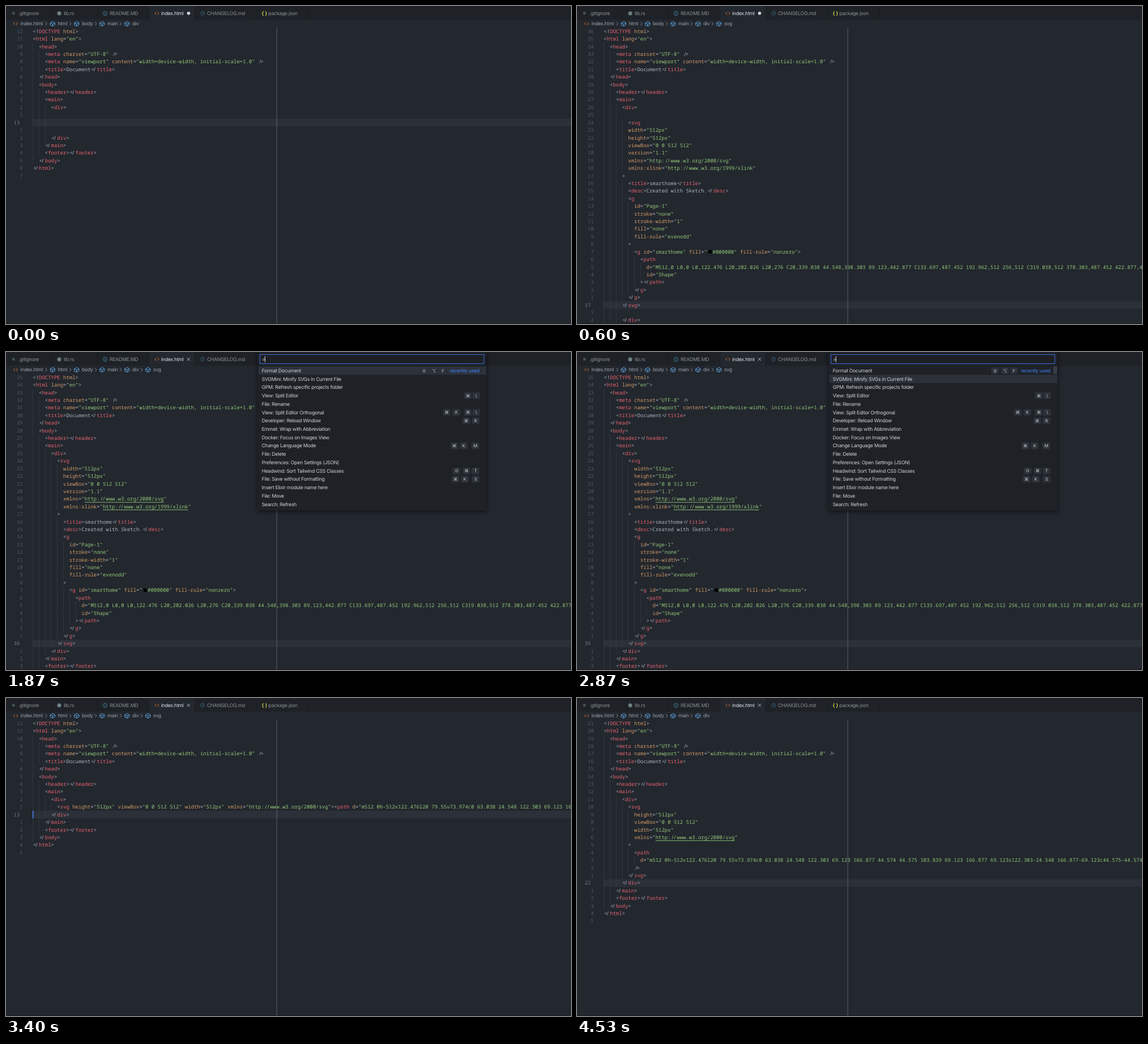
Recreate the animation shown at these times as an HTML page with a canvas. Size 998x561 px, loop 4730 ms.

```html
<!DOCTYPE html>
<html lang="en">
<head>
<meta charset="UTF-8">
<title>Minify SVG in the editor</title>
<style>
html, body { margin: 0; width: 100%; height: 100%; overflow: hidden; background: #23272e; }
canvas { display: block; }
</style>
</head>
<body>
<canvas id="stage" width="998" height="561"></canvas>
<script>
const ctx = document.getElementById('stage').getContext('2d');
const LOOP = 4730, W = 998, H = 561;
const LEFT = 47.3, TOP = 38, ROW = 13.41, CELL = 5.376;
const MONO = '8.96px "Noto Sans Mono", "DejaVu Sans Mono", monospace';
const SANS = '8.68px Inter, "Liberation Sans", sans-serif';
const KEYS = '7.4px Inter, "DejaVu Sans", sans-serif';
const RED = '#e7636f', ORANGE = '#d19a66', GREEN = '#91c778', PLAIN = '#abb2bf';
const SWATCH = '■';

// Documents
const page = (...inner) => [
  '<!DOCTYPE html>', '<html lang="en">', '  <head>', '    <meta charset="UTF-8" />',
  '    <meta name="viewport" content="width=device-width, initial-scale=1.0" />',
  '    <title>Document</title>', '  </head>', '  <body>', '    <header></header>',
  '    <main>', '      <div>', ...inner, '      </div>', '    </main>',
  '    <footer></footer>', '  </body>', '</html>', ''
];

const longSvg = (pad, swatch) => ['        <svg', ...`
  width="512px"
  height="512px"
  viewBox="0 0 512 512"
  version="1.1"
  xmlns="http://www.w3.org/2000/svg"
  xmlns:xlink="http://www.w3.org/1999/xlink"
>
  <title>smarthome</title>
  <desc>Created with Sketch.</desc>
  <g
    id="Page-1"
    stroke="none"
    stroke-width="1"
    fill="none"
    fill-rule="evenodd"
  >
    <g id="smarthome" fill="${swatch}#000000" fill-rule="nonzero">
      <path
        d="M512,0 L0,0 L0,122.476 L20,202.026 L20,276 C20,339.038 44.548,398.303 89.123,442.877 C133.697,487.452 192.962,512 256,512 C319.038,512 378.303,487.452 422.877,442.877 C467.452,398.303"
        id="Shape"
      ></path>
    </g>
  </g>
</svg>`.trim().split('\n').map((s, i) => ' '.repeat(i ? pad : pad + 2) + s)];

const shortPath = 'd="m512 0h-512v122.476l20 79.55v73.974c0 63.038 24.548 122.303 69.123 166.877 ' +
  '44.574 44.575 103.839 69.123 166.877 69.123s122.303-24.548 166.877-69.123c44.575-44.574 69.123-103.839"';

const empty = page('', '', '');
const pasted = page('', ...longSvg(6, ''), '');
const swatched = page('', ...longSvg(6, SWATCH), '');
const tidy = page(...longSvg(8, SWATCH));
const minified = page('        <svg height="512px" viewBox="0 0 512 512" width="512px" ' +
  'xmlns="http://www.w3.org/2000/svg"><path ' + shortPath);
const final = page('        <svg', ...['height="512px"', 'viewBox="0 0 512 512"', 'width="512px"',
  'xmlns="http://www.w3.org/2000/svg"'].map(s => ' '.repeat(10) + s),
  '        >', '          <path', '            ' + shortPath, '          />', '        </svg>');

// Each step changes part of the editor state; caret is a column, or -1 when hidden
const steps = [
  [0, { doc: empty, row: 12, caret: -1, depth: 4, dirty: true, links: false, palette: false }],
  [70, { doc: pasted, row: 36, caret: 12 }],
  [270, { depth: 5 }],
  [400, { doc: swatched }],
  [600, { caret: -1 }],
  [930, { doc: tidy, row: 35, caret: 14 }],
  [1000, { dirty: false }],
  [1070, { links: true }],
  [1400, { caret: -1 }],
  [1870, { palette: true, pick: 0, input: true, thumb: false }],
  [1930, { thumb: true }],
  [2400, { input: false }],
  [2730, { pick: 1 }],
  [2870, { input: true }],
  [3270, { palette: false }],
  [3400, { doc: minified, row: 12, caret: 0, links: false }],
  [3600, { depth: 4 }],
  [3870, { caret: -1 }],
  [4070, { doc: final, row: 21, caret: 0 }],
  [4400, { links: true }],
  [4530, { caret: -1 }]
];

// Drawing helpers
function rect(x, y, w, h, color) {
  ctx.fillStyle = color;
  ctx.fillRect(x, y, w, h);
}

function text(s, x, y, color, font = SANS, align = 'left') {
  ctx.font = font;
  ctx.letterSpacing = font === SANS ? '-0.26px' : '0px';
  ctx.textAlign = align;
  ctx.fillStyle = color;
  ctx.fillText(s, x, y);
}

function line(color, width, ...points) {
  ctx.strokeStyle = color;
  ctx.lineWidth = width;
  ctx.beginPath();
  points.forEach(([x, y]) => ctx.lineTo(x, y));
  ctx.stroke();
}

function circle(x, y, r, color, filled) {
  ctx.beginPath();
  ctx.arc(x, y, r, 0, 7);
  ctx.fillStyle = ctx.strokeStyle = color;
  ctx.lineWidth = 0.8;
  filled ? ctx.fill() : ctx.stroke();
}

function angles(x, y) {
  for (const d of [-1, 1])
    line('#e37933', 1, [x + d * 1.2, y - 2.4], [x + d * 3.6, y], [x + d * 1.2, y + 2.4]);
}

function cube(x, y) {
  const blue = '#61afef', l = [x - 4.2, y - 1.4], r = [x + 4.2, y - 1.4], mid = [x, y + 0.5];
  line(blue, 0.9, l, [x + 0.5, y - 4], r, [x + 4.2, y + 1.8], [x, y + 4.2], [x - 4.2, y + 2.4], l, mid, r);
  line(blue, 0.9, mid, [x, y + 4.2]);
}

function drawTabs(s) {
  rect(0, 0, W, 24, '#1e2227');
  rect(252.5, 0, 81, 24, '#23272e');
  for (const x of [80, 161, 252, 333, 441, 534]) rect(x, 0, 0.8, 24, '#181a1f');
  [['.gitignore', 22], ['lib.rs', 102], ['README.MD', 183], ['index.html', 274],
   ['CHANGELOG.md', 355], ['package.json', 463.5]].forEach(([name, x], i) =>
    text(name, x, 16, i === 3 ? '#e3e5e9' : '#8b9099'));
  rect(11, 10.5, 4.5, 4.5, '#41535b');
  circle(94, 13, 3.5, '#6d8086', true);
  circle(175, 13, 3.7, '#4787a5');
  rect(174.5, 12.2, 1, 3.2, '#4787a5');
  rect(174.5, 10.5, 1, 1, '#4787a5');
  angles(266.5, 12.8);
  circle(347.3, 12.8, 3.4, '#3f6d87');
  line('#3f6d87', 0.8, [347.3, 10.8], [347.3, 13], [349, 13]);
  text('{ }', 451.5, 15.8, '#cbcb41', 'bold ' + SANS);
  if (s.dirty) circle(322.5, 12.8, 2.8, '#d0d3d8', true);
  else for (const d of [-2.6, 2.6]) line('#d0d3d8', 0.9, [322.5 - d, 10.2], [322.5 + d, 15.4]);
}

function drawCrumbs(depth) {
  const gray = '#9da3ad';
  angles(17, 31.3);
  text('index.html', 25.5, 34.3, gray);
  [['html', 91.5], ['body', 134], ['main', 179], ['div', 223], ['svg', 260]].slice(0, depth).forEach(([name, x]) => {
    line(gray, 0.8, [x - 22, 28.2], [x - 19, 31.3], [x - 22, 34.4]);
    cube(x - 9.2, 31.3);
    text(name, x, 34.3, gray);
  });
}

function colors(s) {
  const out = Array(s.length).fill(PLAIN);
  for (const m of s.matchAll(/(<!?\/?)(\w+)|"[^"]*"?|[\w:-]+(?==")|(?<=DOCTYPE )html/g)) {
    const skip = m[1] ? m[1].length : 0;
    const color = skip ? RED : m[0][0] === '"' ? GREEN : ORANGE;
    out.fill(color, m.index + skip, m.index + m[0].length);
  }
  return out;
}

// Pairs such as </ and /> sit closer together than plain cells
function nudge(a, c, b) {
  if (c === '<' && b === '/') return 0.7;
  if (c === '/') return a === '<' ? -1.1 : b === '>' ? 1.1 : b === '/' ? 0.6 : a === '/' ? -0.6 : 0;
  return c === '>' && a === '/' ? -0.7 : 0;
}

function drawLine(s, top, links) {
  const tint = colors(s);
  let x = LEFT;
  for (let i = 0; i < s.length && x < W; i++) {
    const c = s[i];
    if (c === SWATCH) {
      rect(x + 2, top + 3.7, 6, 6, '#000');
      x += 9.5;
      continue;
    }
    if (c !== ' ') text(c, x + nudge(s[i - 1], c, s[i + 1]), top + 9.8, tint[i], MONO);
    x += CELL;
  }
  const url = links && s.match(/http:[^"]+/);
  if (url) rect(LEFT + url.index * CELL, top + 12.1, url[0].length * CELL, 0.9, GREEN);
}

function drawCode(s) {
  rect(LEFT, TOP + s.row * ROW, W, ROW, '#2b3039');
  let indent = 0;
  s.doc.forEach((str, i) => {
    const top = TOP + i * ROW;
    if (top > H) return;
    if (str) indent = str.search(/\S/);
    for (let col = 0; col < indent; col += 2) rect(LEFT + col * CELL, top, 0.7, ROW, '#3a3f48');
    if (i === s.row) text(i + 1, 13.6, top + 9.8, '#737b8a', MONO);
    else text(Math.abs(i - s.row), 29.7, top + 9.8, '#515a6b', MONO, 'right');
    drawLine(str, top, s.links);
  });
  rect(477.8, TOP, 0.9, H, '#60656e');
  if (s.caret >= 0) rect(LEFT - 0.3 + s.caret * CELL, TOP + s.row * ROW, 1.4, ROW, '#528bff');
  rect(0, 560, W, 1, '#181a1f');
}

// Command name, then pairs of key and key centre
const commands = [
  ['Format Document', '⇧', 738.5, '⌥', 756, 'F', 772],
  ['SVGMini: Minify SVGs in Current File'],
  ['GPM: Refresh specific projects folder'],
  ['View: Split Editor', '⌘', 816, '\\', 830.5],
  ['File: Rename'],
  ['View: Split Editor Orthogonal', '⌘', 778.5, 'K', 795.5, '⌘', 816, '\\', 830.5],
  ['Developer: Reload Window', '⌘', 813, 'R', 829.5],
  ['Emmet: Wrap with Abbreviation'],
  ['Docker: Focus on Images View'],
  ['Change Language Mode', '⌘', 792, 'K', 808.5, 'M', 829],
  ['File: Delete'],
  ['Preferences: Open Settings (JSON)'],
  ['Headwind: Sort Tailwind CSS Classes', '⇧', 796, '⌘', 813.5, 'T', 829.5],
  ['File: Save without Formatting', '⌘', 794, 'K', 810.5, 'S', 829.5],
  ['Insert Elixir module name here'],
  ['File: Move'],
  ['Search: Refresh']
];

function drawPalette(s) {
  ctx.save();
  ctx.shadowColor = '#000b';
  ctx.shadowBlur = 7;
  ctx.shadowOffsetY = 1;
  rect(444.5, 0, 404, 279.7, '#1e2227');
  ctx.restore();
  rect(448, 4, 396.5, 17, '#3f68e0');
  rect(449, 5, 394.5, 15, '#1d1f23');
  text('>', 452, 16, '#c8ccd4');
  if (s.input) rect(457, 7.5, 1, 10.5, '#d7dae0');
  rect(446, 25.5 + s.pick * 14.73, 402.5, 14.7, '#2c313a');
  commands.forEach(([name, ...keys], i) => {
    const y = 32.9 + i * 14.73;
    text(name, 451.8, y + 3, '#d0d4db');
    for (let k = 0; k < keys.length; k += 2) {
      ctx.beginPath();
      ctx.roundRect(keys[k + 1] - 6.8, y - 6, 13.6, 12, 2);
      ctx.fillStyle = '#2d3138';
      ctx.fill();
      text(keys[k], keys[k + 1], y + 2.7, '#d0d4db', KEYS, 'center');
    }
  });
  text('recently used', 783.8, 35.9, '#4480f8');
  if (s.thumb) rect(841.5, 25.5, 6.5, 13, '#383d47');
}

let shown = -1;
function tick(now) {
  const t = now % LOOP;
  const past = steps.filter(([at]) => at <= t);
  if (past.length !== shown) {
    shown = past.length;
    const s = Object.assign({}, ...past.map(([, change]) => change));
    ctx.textRendering = 'geometricPrecision';
    rect(0, 0, W, H, '#23272e');
    drawTabs(s);
    drawCrumbs(s.depth);
    drawCode(s);
    if (s.palette) drawPalette(s);
  }
  requestAnimationFrame(tick);
}
tick(0);
</script>
</body>
</html>
```
